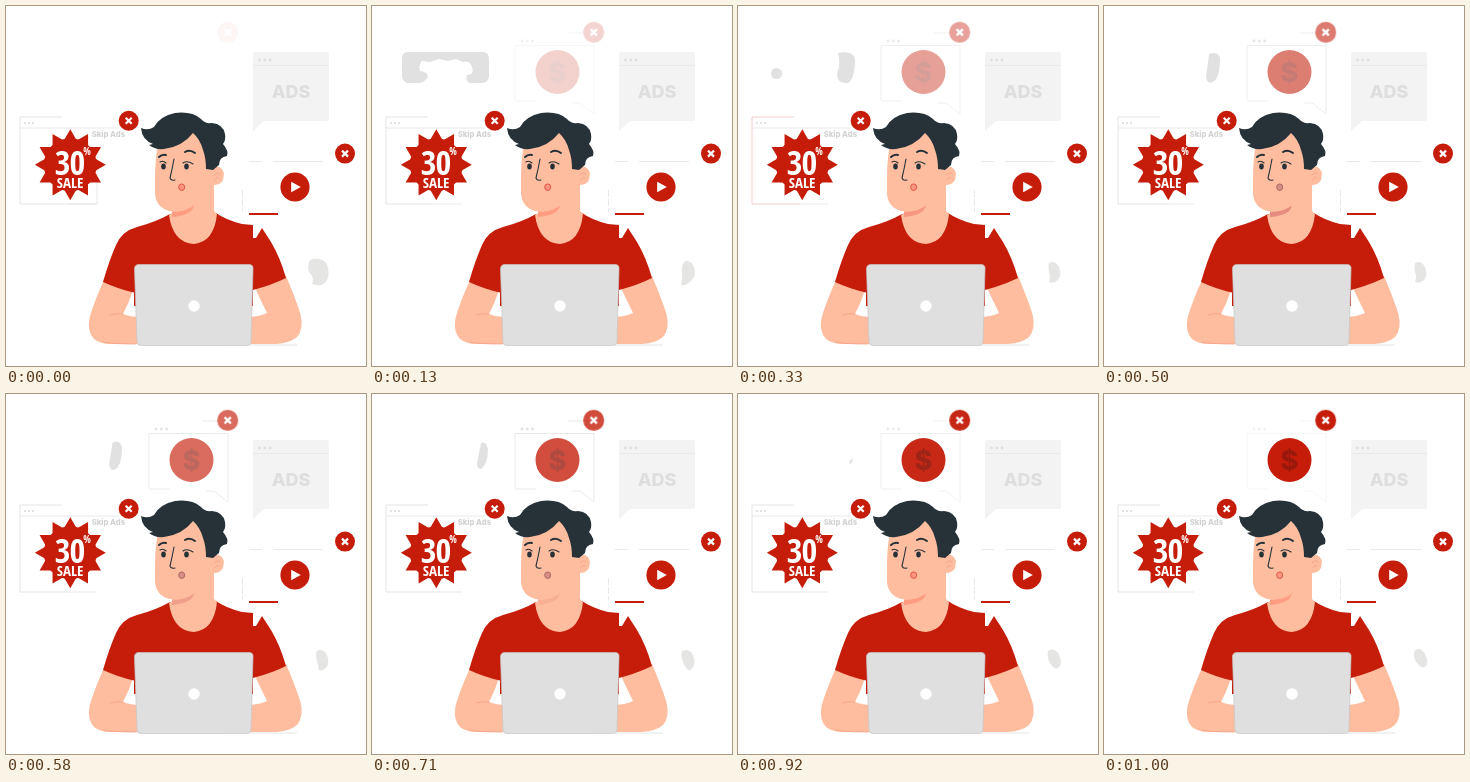
These frames come from a looping animation (360x360 px, 1040 ms). An HTML page without scripts:

```html
<!DOCTYPE html>
<html lang="en">
<head>
<meta charset="utf-8">
<title>Ad pop-ups</title>
<style>
html, body { margin: 0; width: 100%; height: 100%; overflow: hidden; background: #fff; }
svg { display: block; width: 100vw; height: 100vh; }
text { font-family: Inter, "Open Sans", sans-serif; font-weight: 800; text-anchor: middle; }
.sale text { font-family: "Open Sans Condensed", "Roboto Condensed", "Open Sans", Roboto, sans-serif; font-stretch: 75%; font-weight: 700; fill: #fff; }
.red { fill: #c51d0a; }
.skin { fill: #ffbd9f; }
.dark { fill: #263238; }
.line { fill: none; stroke: #e4e4e4; stroke-width: .8; }
.ink { fill: none; stroke: #263238; stroke-width: 1.1; stroke-linecap: round; stroke-linejoin: round; }
.brow { stroke-width: 2; }
.crease { fill: none; stroke: #f4a084; stroke-width: .8; stroke-linecap: round; }

.anim { animation: 1040ms linear infinite; }
.badge { animation-name: badge; }
.coin { animation-name: coin; }
.pane { animation-name: pane; }
.arch { animation-name: arch; }
.dot { animation-name: dot; }
.blob { animation-name: blob; }
.mouse { animation-name: mouse; }
.neck { animation-name: neck; }
.mouth { animation-name: mouth; }
.edge { animation-name: edge; }
.side { animation-name: side; }

@keyframes badge { 0% { opacity: .04 } 12.5% { opacity: .19 } 32% { opacity: .42 } 48% { opacity: .58 } 68% { opacity: .79 } 80% { opacity: .9 } 96%, 100% { opacity: 1 } }
@keyframes coin { 0%, 3.8% { opacity: 0 } 3.9% { opacity: .1 } 12.5% { opacity: .2 } 32% { opacity: .42 } 48% { opacity: .57 } 68% { opacity: .78 } 80% { opacity: .89 } 96%, 100% { opacity: 1 } }
@keyframes pane { 0%, 3.8% { opacity: 0 } 3.9% { opacity: .35 } 32% { opacity: .7 } 68%, 84% { opacity: 1 } 92%, 100% { opacity: .4 } }
@keyframes arch { 0%, 3.8% { opacity: 0 } 3.9%, 23% { opacity: 1 } 27%, 100% { opacity: 0 } }
@keyframes dot { 0%, 23% { opacity: 0 } 27%, 36% { opacity: 1 } 42%, 100% { opacity: 0 } }
@keyframes blob {
  0%, 23% { opacity: 0; d: path("M100 46Q117 44 117 55Q118 73 110 77Q99 78 99 68Q103 58 100 46Z") }
  27%, 32% { opacity: 1; d: path("M100 47Q115 44 117 53Q117 73 110 77Q99 78 99 68Q103 58 100 47Z") }
  48% { d: path("M105 48Q114 45 116 52Q116 72 109 76Q102 78 102 70Q104 58 105 48Z") }
  68% { d: path("M109 49Q114 46 116 55Q116 70 109 75Q105 76 105 69Q107 58 109 49Z") }
  80% { opacity: 1; d: path("M112 61Q115 59 116 63Q115 70 111 73Q108 73 109 68Q110 64 112 61Z") }
  88% { opacity: 1; d: path("M113 65Q115 64 115 66Q114 69 112 70Q111 70 111 68Q112 66 113 65Z") }
  92%, 100% { opacity: 0; d: path("M113 65Q115 64 115 66Q114 69 112 70Q111 70 111 68Q112 66 113 65Z") }
}
@keyframes mouse {
  0%, 3.8% { d: path("M304 254Q315 250 321 258Q325 270 319 277Q314 281 306 278Q309 272 303 266Q301 259 304 254Z") }
  12.5% { d: path("M313 255Q320 254 322 261Q325 270 319 275Q314 280 309 279Q311 273 310 267Q309 260 313 255Z") }
  32%, 48% { d: path("M311 257Q317 254 321 261Q324 269 320 274Q315 278 311 276Q313 271 311 266Q310 260 311 257Z") }
  68%, 80% { d: path("M310 257Q317 254 321 261Q324 268 321 273Q318 278 315 275Q311 270 310 265Q309 260 310 257Z") }
  96%, 100% { d: path("M311 256Q317 253 321 260Q324 266 323 271Q320 275 316 272Q311 268 310 263Q309 259 311 256Z") }
}
@keyframes neck { 0%, 25% { fill: #ff9c82 } 48% { fill: #e58c7e } 62%, 73% { fill: #f8b094 } 79%, 100% { fill: #ff9c82 } }
@keyframes mouth { 0%, 32% { fill: #ff9580; stroke: #dd5746 } 48%, 70% { fill: #d98d82; stroke: #a96d66 } 79%, 100% { fill: #ff9580; stroke: #dd5746 } }
@keyframes edge { 0%, 20% { stroke: #dedede } 32% { stroke: #f2c4be } 44%, 100% { stroke: #dedede } }
@keyframes side { 0%, 3.8% { opacity: 1 } 3.9%, 100% { opacity: 0 } }
</style>
</head>
<body>
<svg viewBox="0 0 360 360">
  <defs>
    <g id="close">
      <circle r="10" class="red"/>
      <path d="M-3-3L3 3M3-3L-3 3" stroke="#fff" stroke-width="2.2"/>
    </g>
    <g id="dots">
      <circle r="1.4"/><circle cx="5.3" r="1.4"/><circle cx="10.6" r="1.4"/>
    </g>
    <path id="tri" d="M0-35.5L30.7 17.75H-30.7Z"/>
  </defs>

  <!-- floating grey shapes -->
  <g fill="#e1e1e1">
    <path class="anim arch" d="M35 46H112Q117 47 117 53V71Q116 77 109 77H98Q93 75 95 69Q103 68 100 61Q99 55 91 56L84 53L76 55L67 53L58 56L50 55Q46 60 48 65Q56 66 56 71Q52 77 46 77H35Q30 75 30 69V52Q30 47 35 46Z"/>
    <circle class="anim dot" cx="38.5" cy="67.5" r="5.6"/>
    <path class="anim blob" d="M100 47Q115 44 117 53Q117 73 110 77Q99 78 99 68Q103 58 100 47Z"/>
  </g>

  <!-- coin window -->
  <g class="anim pane">
    <path class="line" d="M143 94V39.5H222M196 27H212M222 39V108L208 97H200M143 95H164"/>
    <use href="#dots" x="150" y="35" fill="#e0e0e0"/>
  </g>
  <g class="anim coin">
    <circle cx="185.5" cy="66" r="22" class="red"/>
    <text x="185.5" y="76" font-size="27" fill="#9a180b">$</text>
  </g>
  <g class="anim badge"><use href="#close" transform="translate(221.7 26.3) scale(1.05)"/></g>

  <!-- speech window -->
  <path d="M249 46H321Q323 46 323 48V113Q323 115 321 115H258L247 125V48Q247 46 249 46Z" fill="#f3f3f3"/>
  <path d="M247 59.5H323" stroke="#e9e9e9"/>
  <use href="#dots" x="253.5" y="54" fill="#dfdfdf"/>
  <text x="285" y="92" font-size="18" fill="#dedede">ADS</text>

  <!-- sale window -->
  <path class="line anim edge" d="M56 111H14V198H62"/>
  <path class="line" d="M14 122H113M62 198H90"/>
  <path class="line anim side" d="M91 150V198H62"/>
  <use href="#dots" transform="translate(19 117) scale(.75)" fill="#dcdcdc"/>
  <text x="102.4" y="131" font-size="7.7" fill="#d2d2d2">Skip Ads</text>
  <g class="sale">
    <g class="red" transform="translate(64.3 158.8)">
      <circle r="26.5"/>
      <use href="#tri"/><use href="#tri" transform="rotate(30)"/><use href="#tri" transform="rotate(60)"/><use href="#tri" transform="rotate(90)"/>
    </g>
    <text x="63.5" y="169" font-size="34" letter-spacing="-1">30</text>
    <text x="81" y="149" font-size="10">%</text>
    <text x="64" y="182" font-size="15">SALE</text>
  </g>
  <use href="#close" x="122.7" y="114.7"/>

  <!-- video window -->
  <path class="line" d="M243 155.5H256M267 155.5H317"/>
  <path class="line" d="M236.5 184V206" stroke-dasharray="7 2"/>
  <path d="M243 208H272" stroke="#c51d0a" stroke-width="2"/>
  <circle cx="289" cy="181" r="14.6" class="red"/>
  <path d="M285.2 175.8V186.2L294.8 181Z" fill="#fff"/>
  <use href="#close" x="339" y="147.6"/>

  <!-- mouse -->
  <path class="anim mouse" fill="#e5e5e3" d="M311 256Q317 253 321 260Q324 266 323 271Q320 275 316 272Q311 268 310 263Q309 259 311 256Z"/>

  <!-- arms and shirt -->
  <path class="skin" d="M98 274Q88 296 83.5 312Q81 326 88 333Q94 338 105 338H135V311Q124 311 117 308Q123 297 127 284ZM280 270Q289 291 294.5 308Q298 323 291 331Q284 337 270 338H240V311Q253 311 261 307Q255 295 249 282Z"/>
  <path class="crease" d="M98 336Q105 338 130 338M104 309Q110 307 117 308"/>
  <path class="red" d="M164 208Q150 216 131 221Q116 225 110 239Q103 255 97 276Q112 283 128 286.500V300H247V284Q266 279 280 272Q274 251 265 236L256 222L250 232L247 232V219L236 218Q220 214 210 207Z"/>

  <!-- neck and head -->
  <path class="skin" d="M166 190V207L163 209Q167 237 188 238Q208 236 211 208L208 205V170Z"/>
  <path class="anim neck" d="M166 206Q180 206 188 199Q187 209 166 211Z" fill="#ff9c82"/>
  <path class="skin" d="M152 138Q149 154 149 172V188Q150 201 163 205Q179 207 190 198Q199 191 203 178Q213 181 217 174Q220 164 213 161Q208 160 205 164L204 122H178Z"/>
  <path class="crease" d="M208 169Q212 165 214 168M209 174Q211 170 213 172"/>
  <path class="dark" d="M135 122Q142 125 148 121Q154 110 169 107Q186 105 195 113Q199 118 206 117Q217 118 219 128Q220 134 217 138Q223 145 221 150Q213 151 213 159L207 164L200 163Q200 152 197 144Q194 133 187 127Q176 141 158 143Q149 144 143 139L147 138Q136 134 135 122Z"/>
  <ellipse class="dark" cx="157.500" cy="160.500" rx="2.3" ry="2.9"/>
  <ellipse class="dark" cx="180.500" cy="160.500" rx="2.3" ry="2.9"/>
  <path class="ink brow" d="M153 151Q156 148 160 149M179 146Q184 143 189 147"/>
  <path class="ink" d="M154 156Q157 154 160 157M177 157Q181 154 187 158M168 153Q166 164 164 172Q165 175 169 174"/>
  <ellipse class="anim mouth" cx="175.7" cy="181.2" rx="3" ry="3.3" fill="#ff9580" stroke="#dd5746"/>

  <!-- laptop -->
  <path d="M133 258.5H243Q247.5 258.5 247 263L245 336Q245 339.5 241 339.5H135Q131 339.5 131 336L128.5 263Q128.5 258.5 133 258.5Z" fill="#dfdfdf" stroke="#c6c6c6" stroke-width=".7"/>
  <path d="M222 339H291" stroke="#ddd" stroke-width=".8"/>
  <circle cx="188" cy="300" r="5.7" fill="#fff"/>
</svg>
</body>
</html>
```
